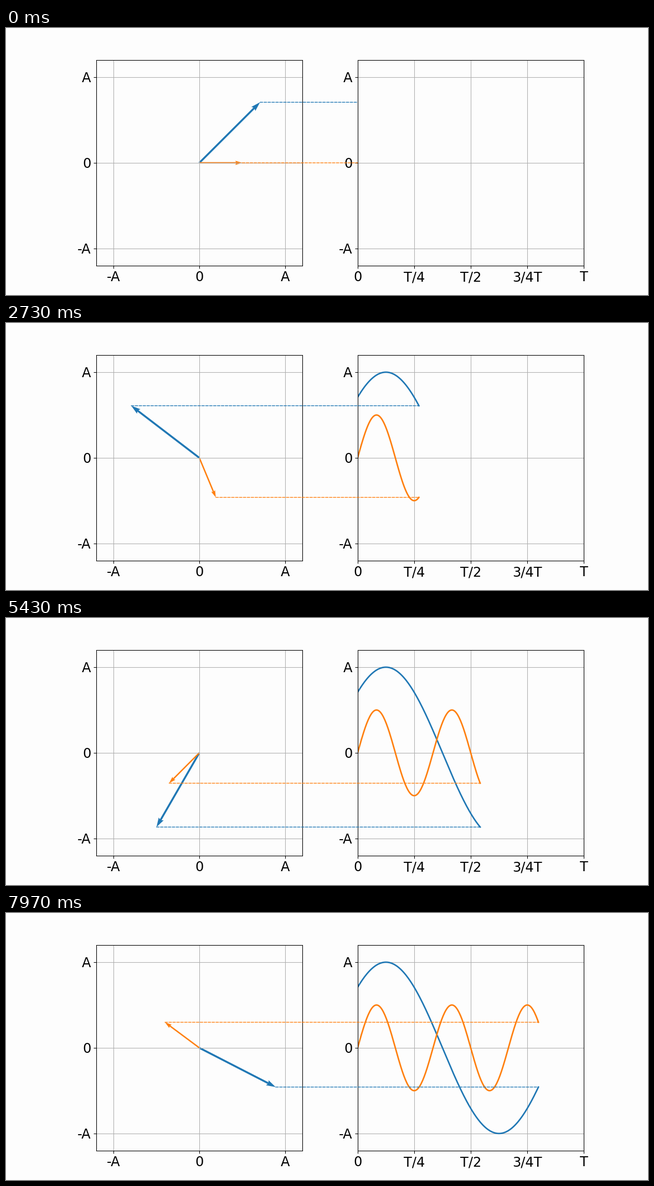
Write a matplotlib script that moves like this. It is 1159x483 px and loops after 8 s.

```python
import numpy as np
import matplotlib.pyplot as plt
from matplotlib.animation import FuncAnimation
from matplotlib.patches import ConnectionPatch

WIDTH, HEIGHT, DPI = 1159, 483, 96
FRAMES, LOOP_MS = 240, 8000
A = 4
BACKGROUND = "#fdfdfd"

plt.rcParams.update({
    "font.family": "DejaVu Sans",
    "font.size": 18.1,
    "figure.facecolor": BACKGROUND,
    "axes.facecolor": BACKGROUND,
})

time = np.linspace(0, 1, 300)  # in periods T

fig, (circle_ax, wave_ax) = plt.subplots(
    1, 2, figsize=(WIDTH / DPI, HEIGHT / DPI), dpi=DPI)


class Phasor:
    """Rotating arrow, its projected wave and the dashed link between them."""

    def __init__(self, amplitude, speed, phase, color, shaft):
        angle = 2 * np.pi * speed * time + phase
        self.x = amplitude * np.cos(angle)
        self.y = amplitude * np.sin(angle)
        self.arrow = circle_ax.quiver(
            0, 0, self.x[0], self.y[0], color=color, angles="xy",
            scale_units="xy", scale=1, units="dots", width=shaft)
        self.wave, = wave_ax.plot([], [], color=color, lw=2)
        self.link = ConnectionPatch(
            (self.x[0], self.y[0]), (0, self.y[0]), "data", "data",
            axesA=circle_ax, axesB=wave_ax, color=color, ls="--", lw=1)
        fig.add_artist(self.link)

    def show(self, i):
        self.arrow.set_UVC(self.x[i], self.y[i])
        self.wave.set_data(time[:i + 1], self.y[:i + 1])
        self.link.xy1 = self.x[i], self.y[i]
        self.link.xy2 = time[i], self.y[i]


phasors = [
    Phasor(A, 1, np.pi / 4, "C0", 3.4),
    Phasor(A / 2, 3, 0, "C1", 2.5),
]

amplitude_ticks = dict(ticks=[-A, 0, A], labels=["-A", "0", "A"])
limit = 1.2 * A
circle_ax.set_aspect("equal")
circle_ax.set_xlim(-limit, limit)
circle_ax.set_xticks(**amplitude_ticks)
wave_ax.set_xlim(0, 1)
wave_ax.set_xticks([0, 0.25, 0.5, 0.75, 1], ["0", "T/4", "T/2", "3/4T", "T"])
for ax in (circle_ax, wave_ax):
    ax.set_ylim(-limit, limit)
    ax.set_yticks(**amplitude_ticks)
    ax.grid(True)


def update(i):
    for phasor in phasors:
        phasor.show(i)
    return []


anim = FuncAnimation(fig, update, frames=FRAMES, interval=LOOP_MS / FRAMES,
                     init_func=lambda: update(0), repeat=True, repeat_delay=0)
plt.show()
```
